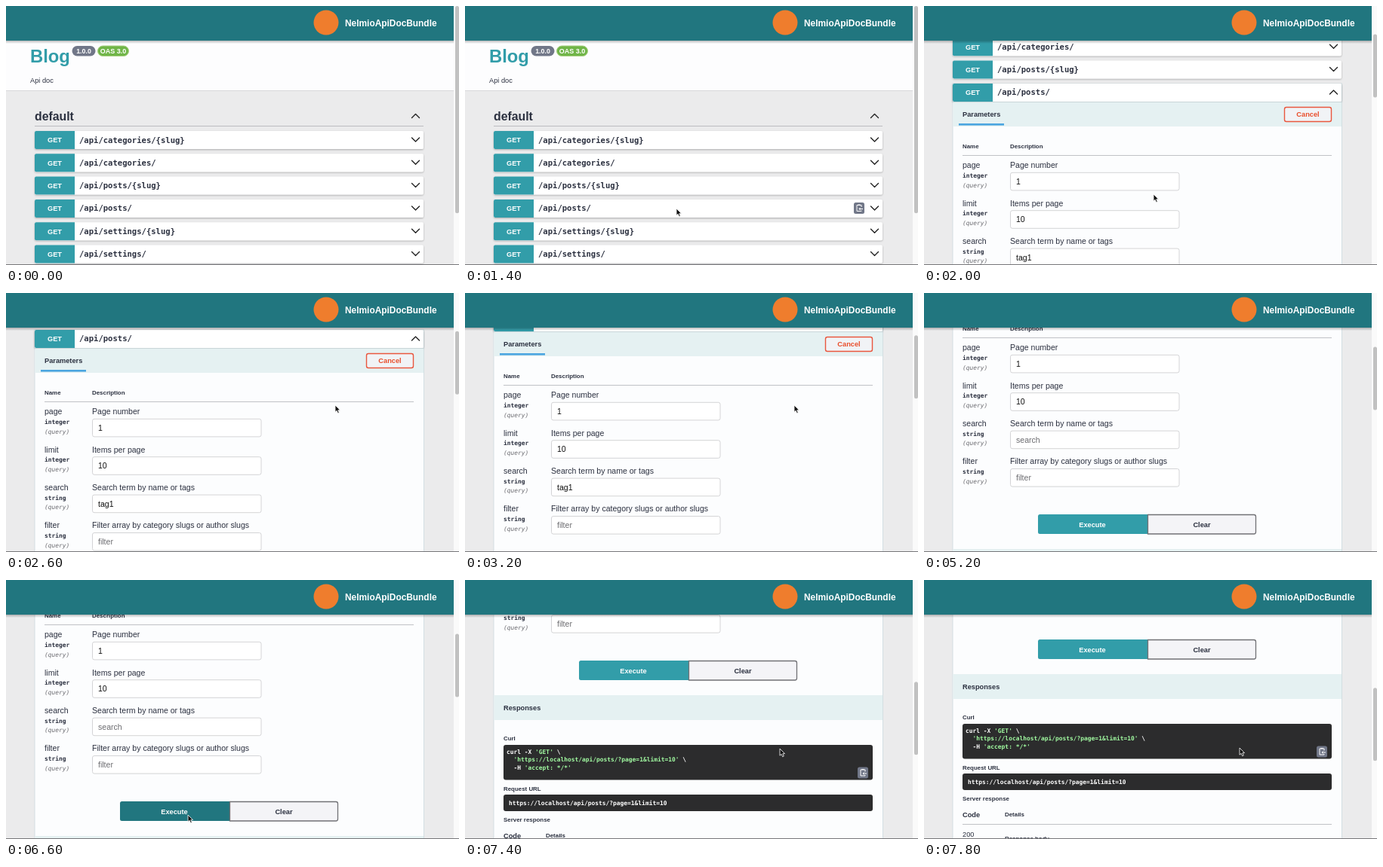
An HTML page that plays this animation: 600x344 px, repeating every 8000 ms.

```html
<!DOCTYPE html>
<html lang="en">
<head>
<meta charset="utf-8">
<title>API documentation</title>
<style>
  html, body { margin: 0; width: 100%; height: 100%; overflow: hidden; }
  svg { display: block; width: 600px; height: 344px; }
  text { font: 9.24px "Liberation Sans", Arial, sans-serif; fill: #2c3140; white-space: pre; }
  .b { font-weight: bold; }
  .mono { font-family: "DejaVu Sans Mono", monospace; font-weight: bold; }
  .mid { text-anchor: middle; }
  .white { fill: #fff; }
  .string { fill: #a2fca2; }
  .chevron { fill: none; stroke: #222; stroke-width: 1.4; stroke-linecap: round; stroke-linejoin: round; }
</style>
</head>
<body>
<svg id="stage" viewBox="0 0 600 344"></svg>
<script>
const TEAL = '#329da9', DARK_TEAL = '#21767f', TINT = '#e5f1f2', SLATE = '#717788';
const LOOP = 8000, STEP = 200;

const rect = (x, y, w, h, fill, extra = '') =>
  `<rect x="${x}" y="${y}" width="${w}" height="${h}" fill="${fill}" ${extra}/>`;
const text = (x, y, str, cls = '', size = 9.24, fill = '') =>
  `<text x="${x}" y="${y}" class="${cls}" style="font-size:${size}px;${fill && 'fill:' + fill}">${str}</text>`;
const line = (x1, x2, y, color) => rect(x1, y, x2 - x1, 1, color);
const chevron = (y, dir) => `<path class="chevron" d="M537.5 ${y - 2.5 * dir}l5 ${5 * dir}l5 ${-5 * dir}"/>`;
const copyIcon = (x, y) => rect(x, y, 14, 15, SLATE, 'rx="2.5"') +
  `<path d="M${x + 10} ${y + 6}v-2.5h-6v8h6v-1M${x + 12} ${y + 8.5}h-5m1.5-1.5l-1.5 1.5l1.5 1.5M${x + 5.5} ${y + 3}h3"
    fill="none" stroke="#fff" stroke-width="1"/>`;

// Page content, in unscrolled page coordinates
const row = (path, y) =>
  rect(38, y, 515, 24, '#fff', 'rx="2" filter="url(#soft)"') +
  `<path d="M40 ${y}h51v24h-51q-2 0 -2 -2v-20q0 -2 2 -2" fill="${TEAL}"/>` +
  text(64.5, y + 15.4, 'GET', 'b mid white') + text(97, y + 15.5, path, 'mono', 10.56);

const paths = ['categories/{slug}', 'categories/', 'posts/{slug}', 'posts/', 'settings/{slug}', 'settings/'];
const rowTop = i => 166 + 30.3 * i;

const intro =
  rect(0, 0, 593, 112, '#fdfdfe') + line(0, 593, 112, '#d8d8da') +
  text(32, 75, 'Blog', 'b', 23.8, TEAL) +
  rect(87.5, 53, 31, 13.5, SLATE, 'rx="6.7"') + text(103, 62.8, '1.0.0', 'b mid white', 8.8) +
  rect(121.5, 53, 41, 13.5, '#70b548', 'rx="6.7" stroke="#a5cf7e"') + text(142, 62.9, 'OAS 3.0', 'b mid white', 9) +
  text(32, 101.5, 'Api doc') +
  text(38, 152, 'default', 'b', 15.84) + chevron(146, -1) + line(38, 553, 159, '#bcbcc0');

const list = paths.map((p, i) =>
  `<g ${i > 3 ? 'class="below"' : ''}>${row('/api/' + p, rowTop(i))}${i === 3 ? '' : chevron(rowTop(i) + 11.5, 1)}</g>`).join('');

const parameters = [
  ['page', 'integer', 'Page number', '1'],
  ['limit', 'integer', 'Items per page', '10'],
  ['search', 'string', 'Search term by name or tags', 'tag1'],
  ['filter', 'string', 'Filter array by category slugs or author slugs', '']
];
const parameter = ([name, type, label, value], i) => {
  const y = 375 + 50.4 * i;
  const id = name === 'search' ? 'id="search"' : '';
  return text(51, y - 5.8, name, '', 10.56) + text(51, y + 7, type, 'mono', 7.92) +
    `<g font-style="italic">${text(51, y + 19.6, '(query)', 'mono" font-style="italic', 7.92, '#6b6b70')
      .replace('style="font-size', 'style="font-weight:normal;font-style:italic;font-size')}</g>` +
    text(114, y - 5.8, label, '', 10.56) +
    rect(114.5, y + .3, 223.5, 23.6, '#fff', 'rx="2.5" stroke="#d4d4d6"') +
    (id ? rect(121.5, y + 5, 22, 14, '#b3d7ff', 'id="selection"') : '') +
    `<g ${id}>${text(122, y + 16, value || name, '', 10.56, value ? '#111' : '#6c6c70')}</g>`;
};

const curl = [
  `curl -X <tspan class="string">'GET'</tspan> \\`,
  `  <tspan class="string">'https://localhost/api/posts/?page=1&amp;limit=10'</tspan> \\`,
  `  -H <tspan class="string">'accept: */*'</tspan>`
];

const operation =
  rect(38, 257, 515.5, 1000, '#fcfdfe', 'stroke="#d3dee2"') + row('/api/posts/', rowTop(3)) +
  line(38, 553, 281, '#c9d5d8') + rect(38.5, 282, 514.5, 32, TINT) +
  text(51, 301.2, 'Parameters', 'b') + rect(46, 310, 60, 2.6, '#4aa5e0') +
  rect(477.5, 288.5, 62, 19, '#f1f3f6', 'rx="2.5" stroke="#e9573f" stroke-width="1.4"') +
  text(508.5, 301.2, 'Cancel', 'b mid', 9.24, '#e94f2c') +
  text(51, 342.5, 'Name', 'b', 7.92) + text(114, 342.5, 'Description', 'b', 7.92) + line(51, 540, 352, '#c0c2c6') +
  parameters.map(parameter).join('') +
  `<path id="execute" d="M153.500 587h143v26h-143q-2.5 0 -2.5 -2.500v-21q0 -2.500 2.500 -2.500"/>` +
  `<path d="M296.5 587.5h140.500q2.500 0 2.500 2.500v20.500q0 2.500 -2.500 2.500h-140.500z" fill="#f4f4f7" stroke="#717175" stroke-width="1.300"/>` +
  text(223, 603.6, 'Execute', 'b mid white') + text(368, 603.6, 'Clear', 'b mid') +
  rect(38.5, 633, 514.5, 33, TINT) + text(51, 653, 'Responses', 'b') +
  text(51, 693, 'Curl', 'b', 7.92) + rect(51, 699, 489, 46.5, '#2c2c2d', 'rx="3"') +
  curl.map((code, i) => text(55, 710.6 + 10.5 * i, code, 'mono white', 7.92)).join('') + copyIcon(520, 728.5) +
  text(51, 759.5, 'Request URL', 'b', 7.92) + rect(51, 765, 489, 22, '#2c2c2d', 'rx="3"') +
  text(58, 778.8, 'https://localhost/api/posts/?page=1&amp;limit=10', 'mono white', 7.92) +
  text(51, 801, 'Server response', 'b', 7.92) +
  text(51, 822.6, 'Code', 'b') + text(107, 822, 'Details', 'b', 7.92) + line(51, 540, 832, '#c0c2c6') +
  text(51, 848.6, '200') + text(107, 853.5, 'Response body', 'b', 7.92);

const stage = document.getElementById('stage');
stage.innerHTML = `
  <defs>
    <filter id="soft" x="-5%" y="-20%" width="110%" height="150%">
      <feDropShadow dx="0" dy="1" stdDeviation="0.9" flood-opacity=".28"/>
    </filter>
    <linearGradient id="fade" x2="0" y2="1">
      <stop stop-opacity=".26"/><stop offset="1" stop-opacity="0"/>
    </linearGradient>
  </defs>
  ${rect(0, 0, 600, 344, '#ebebec')}
  <g id="page">
    ${intro}${list}
    <g id="open">${operation}</g>
    <g id="copy">${copyIcon(515, 261)}</g>
    <g id="down">${chevron(268.5, 1)}</g><g id="up">${chevron(268.5, -1)}</g>
  </g>
  ${rect(0, 46, 593, 4, 'url(#fade)')}${rect(0, 0, 593, 46, DARK_TEAL)}
  <circle cx="424" cy="22" r="16.5" fill="#ef7d2d"/>
  <text x="449" y="27" class="b white" style="font-size:11.9px">NelmioApiDocBundle</text>
  ${rect(593, 0, 7, 344, '#fafafa')}${rect(595, 0, 5, 0, '#c1c1c1', 'id="thumb" rx="2.5"')}
  ${rect(0, 343, 600, 1, '#77777a')}
  <path id="cursor" d="M0 0v9.200l2.100-1.900l1.500 3.400l1.700-.7l-1.500-3.300h2.800z"
    fill="#111" stroke="#fff" stroke-width=".8"/>`;

const el = id => document.getElementById(id);
const show = (node, on) => node.setAttribute('visibility', on ? 'visible' : 'hidden');

// Keys are [time, ...values]; values ease between neighbouring keys
const scrollKeys = [[0, 0], [1600, 0], [2200, 208], [3000, 208], [3600, 293], [6800, 293], [7400, 480], [7800, 508]];
const cursorKeys = [
  [800, 345, 318], [1400, 280, 269], [1800, 280, 269], [2600, 436, 149], [3200, 436, 149], [3800, 382, 278],
  [4400, 155, 194], [4800, 60, 194], [6000, 60, 194], [6600, 241, 312], [6800, 241, 312], [7400, 417, 224], [7800, 418, 223]
];
function sample(keys, t) {
  const i = keys.findIndex(k => k[0] > t);
  if (i < 0) return keys[keys.length - 1].slice(1);
  if (i === 0) return keys[0].slice(1);
  const a = keys[i - 1], b = keys[i];
  const u = (t - a[0]) / (b[0] - a[0]), eased = u * u * (3 - 2 * u);
  return a.slice(1).map((v, n) => v + (b[n + 1] - v) * eased);
}

const searchText = el('search').firstElementChild;

function draw(t) {
  const opened = t >= 1600, cleared = t >= 5200, executed = t >= 6800;
  const scroll = Math.round(sample(scrollKeys, t)[0]);
  const [x, y] = sample(cursorKeys, t).map(Math.round);
  const pageHeight = !opened ? 430 : executed ? 1220 : 1409;
  const rowHover = x > 38 && x < 553 && y + scroll > 257 && y + scroll < 281 && t >= 800;
  const executeHover = x > 151 && x < 296 && y + scroll > 587 && y + scroll < 613;

  el('page').setAttribute('transform', `translate(0 ${-scroll})`);
  show(el('open'), opened);
  show(el('up'), opened);
  show(el('down'), !opened);
  document.querySelectorAll('.below').forEach(node => show(node, !opened));
  show(el('copy'), rowHover);

  searchText.textContent = cleared ? 'search' : 'tag1';
  searchText.style.fill = cleared ? '#6c6c70' : '#111';
  show(el('selection'), t >= 4600 && !cleared);
  el('execute').setAttribute('fill', executeHover ? DARK_TEAL : TEAL);

  el('thumb').setAttribute('y', scroll * 344 / pageHeight);
  el('thumb').setAttribute('height', 344 * 344 / pageHeight);
  el('cursor').setAttribute('transform', `translate(${x} ${y})`);
  show(el('cursor'), t >= 800 && !(t >= 5200 && t < 6200));
}

const start = performance.now();
function tick() {
  const t = (performance.now() - start) % LOOP;
  draw(Math.floor(t / STEP) * STEP);
  requestAnimationFrame(tick);
}
tick();
</script>
</body>
</html>
```
